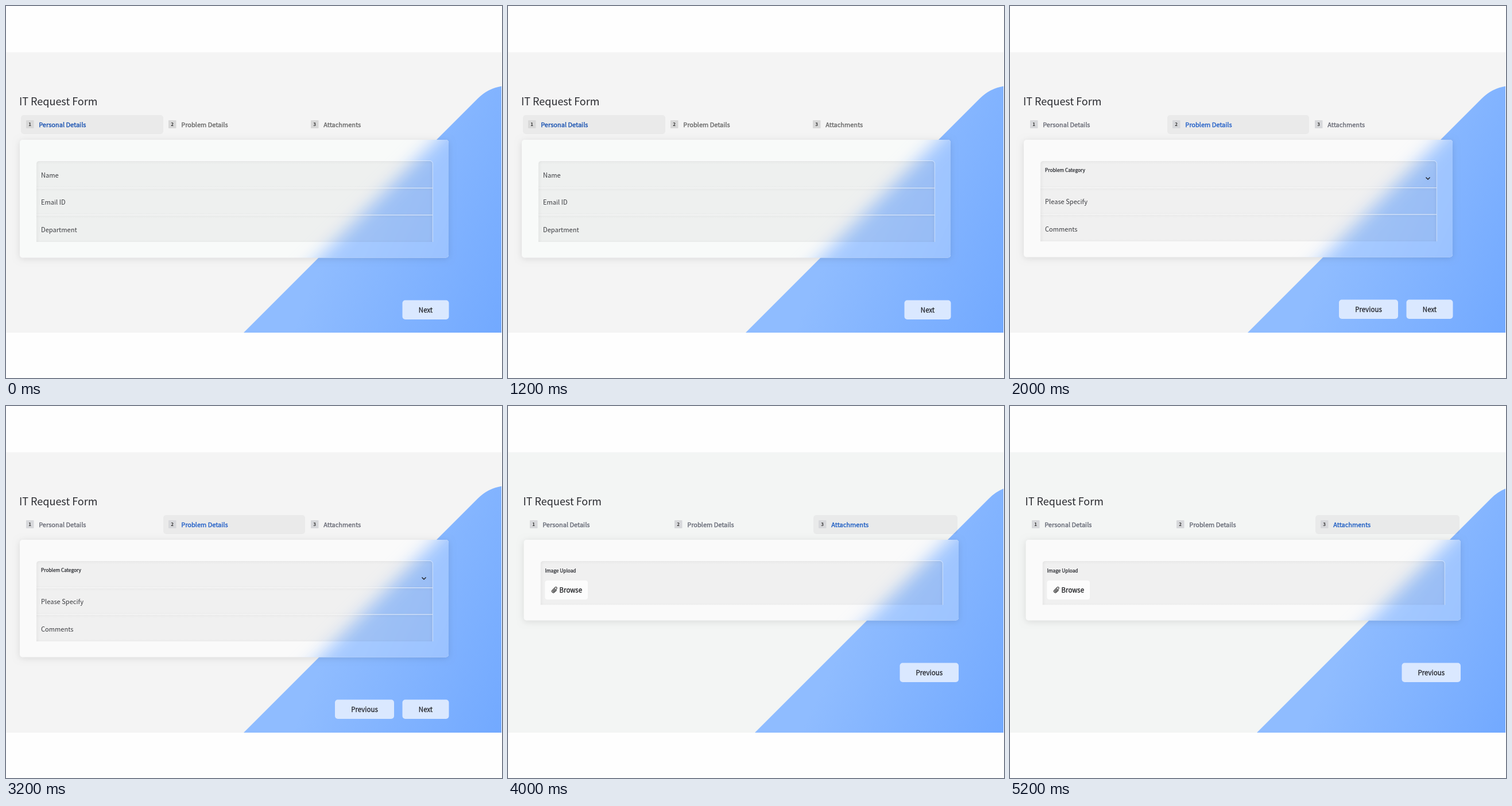
Animation, 864 px wide and 648 px high, one loop 6 s. Source, as an HTML page with a canvas:

```html
<!DOCTYPE html>
<html lang="en">
<head>
<meta charset="utf-8">
<title>Request form</title>
<style>
  html, body { margin: 0; width: 100%; height: 100%; overflow: hidden; background: #fefefe; }
  canvas { display: block; }
</style>
</head>
<body>
<canvas id="stage" width="864" height="648"></canvas>
<script>
const ctx = document.getElementById('stage').getContext('2d');
const FONT = '"Noto Sans CJK JP", "Noto Sans CJK SC", "Noto Sans CJK", "Noto Sans", sans-serif';
const STEP_MS = 2000;
const TABS = ['Personal Details', 'Problem Details', 'Attachments'];

const STEPS = [
  {
    page: '#f4f4f4', shift: 0, left: 24, right: 771, cardBottom: 438.5, tint: '#f6f8f7',
    tabs: [35, 283, 531], tabBox: [26, 274], accent: '#1c54b2', idle: '#6b6b6b', badge: '#d8d8d8',
    rows: [270, 317, 364, 411],
    labels: [['Name', 299], ['Email ID', 346], ['Department', 393.5]],
    buttons: [['Next', 690.5, 81]], buttonY: 512.5
  },
  {
    page: '#f4f4f4', shift: 0, left: 24, right: 771, cardBottom: 437.5, tint: '#f8f8f8',
    tabs: [35, 283, 531], tabBox: [274, 521], accent: '#2360c8', idle: '#6b6d78', badge: '#d7d8db',
    rows: [270, 316.5, 363, 410],
    labels: [['Please Specify', 345], ['Comments', 392.5]],
    caption: 'Problem Category', captionY: 289, chevron: true,
    buttons: [['Previous', 573, 103], ['Next', 690.5, 81]], buttonY: 511.5
  },
  {
    page: '#f3f5f4', shift: 16, left: 27.5, right: 785, cardBottom: 373.5, tint: '#f8f8f8',
    tabs: [38, 290, 541], tabBox: [532, 783], accent: '#1f5fc4', idle: '#686c78', badge: '#d7d8db',
    rows: [270, 346.5],
    labels: [],
    caption: 'Image Upload', captionY: 289.5, browse: true,
    buttons: [['Previous', 682.5, 102.5]], buttonY: 447.5
  }
];

function roundBox(x, y, w, h, r, fill) {
  ctx.beginPath();
  ctx.roundRect(x, y, w, h, r);
  ctx.fillStyle = fill;
  ctx.fill();
}

// A thin outline of the same colour gives intermediate font weights.
function text(str, x, y, size, color, { heavy = 0, align = 'left', weight = 400 } = {}) {
  ctx.font = `${weight} ${size}px ${FONT}`;
  ctx.textAlign = align;
  ctx.fillStyle = ctx.strokeStyle = color;
  ctx.fillText(str, x, y);
  if (heavy) {
    ctx.lineWidth = heavy;
    ctx.lineJoin = 'round';
    ctx.strokeText(str, x, y);
  }
}

function line(points, color, width) {
  ctx.beginPath();
  points.forEach(([x, y]) => ctx.lineTo(x, y));
  ctx.strokeStyle = color;
  ctx.lineWidth = width;
  ctx.stroke();
}

function shade(x, y, w, h, x0, y0, x1, y1, alpha) {
  const g = ctx.createLinearGradient(x0, y0, x1, y1);
  g.addColorStop(0, `rgba(0,0,0,${alpha})`);
  g.addColorStop(1, 'rgba(0,0,0,0)');
  ctx.fillStyle = g;
  ctx.fillRect(x, y, w, h);
}

function blueShape(shift) {
  const g = ctx.createLinearGradient(560 + shift, 430, 863, 569);
  g.addColorStop(0, '#8fbcff');
  g.addColorStop(1, '#72a9ff');
  ctx.beginPath();
  ctx.moveTo(283 + shift, 700);
  ctx.arc(875.7 + shift, 214.7, 76, -Math.PI * 3 / 4, -Math.PI / 2);
  ctx.lineTo(1000, 138.7);
  ctx.lineTo(1000, 700);
  ctx.fillStyle = g;
  ctx.fill();
}

function card(s) {
  const w = s.right - s.left, h = s.cardBottom - 233;
  ctx.save();
  ctx.shadowColor = 'rgba(0,0,0,0.11)';
  ctx.shadowBlur = 12;
  ctx.shadowOffsetY = 2;
  roundBox(s.left, 233, w, h, 5, s.page);
  ctx.restore();

  ctx.save();
  ctx.beginPath();
  ctx.roundRect(s.left, 233, w, h, 5);
  ctx.clip();
  ctx.fillStyle = s.tint;
  ctx.fillRect(s.left, 233, w, h);
  ctx.filter = 'blur(15px)';
  blueShape(s.shift);
  ctx.filter = 'none';
  ctx.fillStyle = 'rgba(255,255,255,0.22)';
  ctx.fillRect(s.left, 233, w, h);
  ctx.restore();
}

function fields(s) {
  const x = s.left + 29, right = s.right - 28, w = right - x;
  const top = s.rows[0], bottom = s.rows[s.rows.length - 1];
  ctx.save();
  ctx.beginPath();
  ctx.roundRect(x, top, w, bottom - top, [5, 5, 0, 0]);
  ctx.clip();
  ctx.fillStyle = 'rgba(0,0,0,0.04)';
  ctx.fillRect(x, top, w, bottom - top);
  s.rows.slice(0, -1).forEach((y, i) => {
    const end = s.rows[i + 1];
    shade(x, y, w, 6, 0, y, 0, y + 6, 0.03);
    shade(x, end - 4, w, 4, 0, end, 0, end - 4, 0.02);
    if (i) line([[x, y + 0.2], [right, y + 0.2]], 'rgba(255,255,255,0.65)', 1.3);
  });
  shade(x, top, 6, bottom - top, x, 0, x + 6, 0, 0.035);
  shade(right - 6, top, 6, bottom - top, right, 0, right - 6, 0, 0.035);
  ctx.restore();

  ctx.beginPath();
  ctx.moveTo(x + 3, top - 0.5);
  ctx.arcTo(right + 0.3, top - 0.5, right + 0.3, bottom, 5);
  ctx.lineTo(right + 0.3, bottom);
  ctx.strokeStyle = 'rgba(255,255,255,0.5)';
  ctx.lineWidth = 1;
  ctx.stroke();

  s.labels.forEach(([label, y]) => text(label, x + 8, y, 11.1, '#3b3c40'));
  if (s.caption) text(s.caption, x + 8, s.captionY, 8.3, '#25272c', { heavy: 0.25 });
  if (s.chevron) line([[724.5, 298.5], [728, 302], [731.5, 298.5]], '#22242a', 1.5);
  if (s.browse) browseButton();
}

function browseButton() {
  roundBox(64.5, 304, 74.5, 33, 4, '#fcfcfc');
  ctx.save();
  ctx.translate(81.2, 320.5);
  ctx.rotate(Math.PI / 4);
  ctx.strokeStyle = '#222';
  ctx.lineWidth = 1;
  ctx.stroke(new Path2D('M2.6-2.5V3A2.6 2.6 0 0 1-2.6 3V-4A1.8 1.8 0 0 1 1-4V2.6A.9.9 0 0 1-.8 2.6V-2.5'));
  ctx.restore();
  text('Browse', 89.6, 325, 11.4, '#1c1d20', { heavy: 0.3 });
}

function tabs(s, active) {
  const [from, to] = s.tabBox;
  roundBox(from, 190, to - from, 33, 5, 'rgba(0,0,0,0.043)');
  TABS.forEach((label, i) => {
    const x = s.tabs[i];
    roundBox(x, 199, 13.5, 14, 1, s.badge);
    text(i + 1, x + 6.7, 209.2, 8, '#333', { align: 'center', weight: 700 });
    text(label, x + 22.2, 210.8, 11, i === active ? s.accent : s.idle, { heavy: 0.4 });
  });
}

function draw(index) {
  const s = STEPS[index];
  ctx.fillStyle = '#fefefe';
  ctx.fillRect(0, 0, 864, 648);
  ctx.fillStyle = '#f9f9f9';
  ctx.fillRect(0, 80, 863, 489);

  ctx.save();
  ctx.beginPath();
  ctx.rect(1, 81, 862, 488);
  ctx.clip();
  ctx.fillStyle = s.page;
  ctx.fillRect(1, 81, 862, 488);
  blueShape(s.shift);
  text('IT Request Form', s.left - 1, 172.8, 18, '#292a2f');
  tabs(s, index);
  card(s);
  fields(s);
  s.buttons.forEach(([label, x, w]) => {
    roundBox(x, s.buttonY, w, 33.5, 5, '#dae8ff');
    text(label, x + w / 2, s.buttonY + 21, 11.5, '#222429', { heavy: 0.3, align: 'center' });
  });
  ctx.restore();
}

const start = performance.now();
let shown = -1;
function tick() {
  const index = Math.floor((performance.now() - start) / STEP_MS) % STEPS.length;
  if (index !== shown) draw(shown = index);
  requestAnimationFrame(tick);
}
tick();
</script>
</body>
</html>
```
